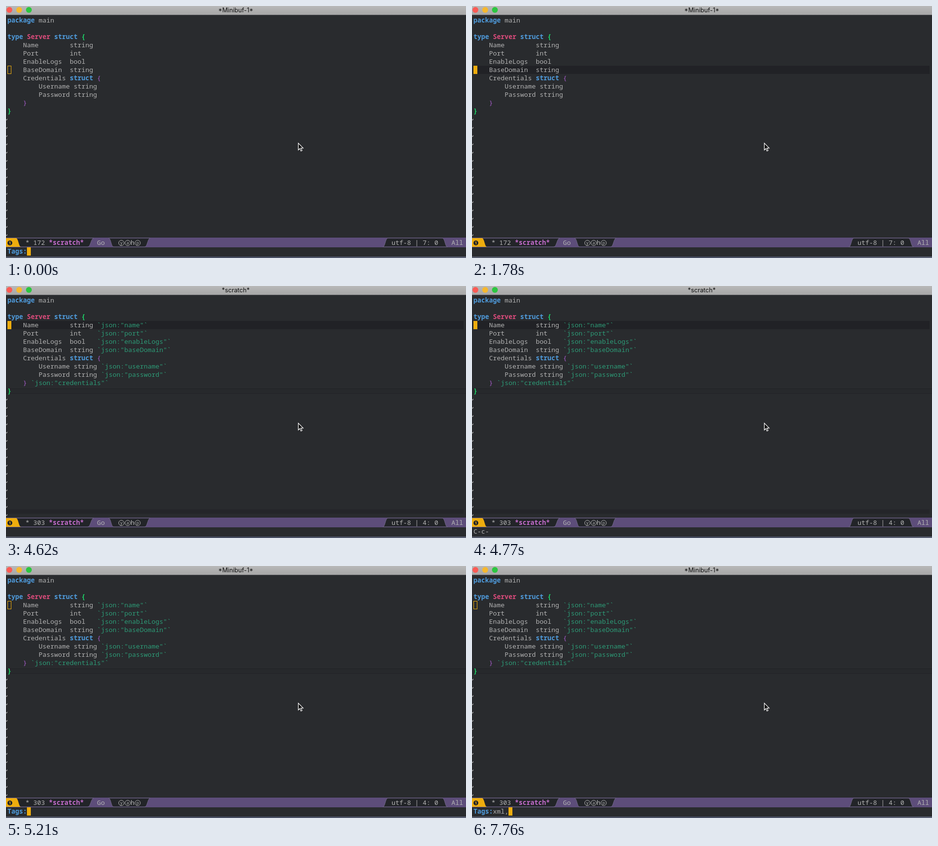
An HTML page with a canvas for the animation above (8 s loop, 945 by 519 pixels).

```html
<!DOCTYPE html>
<html lang="en">
<head>
<meta charset="utf-8">
<title>Editor session</title>
<style>
  html, body { margin: 0; width: 100%; height: 100%; overflow: hidden; background: #292b2e; }
  canvas { display: block; }
</style>
</head>
<body>
<canvas id="stage" width="945" height="519"></canvas>
<script>
const ctx = document.getElementById('stage').getContext('2d');
const W = 945, H = 519, LOOP = 8000;
const COL = 8, ROW = 17, LEFT = 3, TOP = 21, MINI_TOP = 497;
const MONO = '13.333px "Noto Sans Mono", "DejaVu Sans Mono", monospace';

const C = {
  bg: '#292b2e', dark: '#222428', line: '#212226', text: '#b2b2b2', blue: '#4f9bdc',
  rose: '#dc4c7c', green: '#1ed468', violet: '#a45bc8', pink: '#c36ccb',
  teal: '#2d9a76', amber: '#eead0e', purple: '#5d4d7a', seam: '#6f6784'
};

const BASE = { title: '*Minibuf-1*', tags: false, focus: false, line: 7, mini: [] };
const prompt = typed => ({ mini: [['Tags:', C.blue, 'bold'], [typed, C.text]], caret: 5 + typed.length });

// Each step overrides the state left by the one before it.
const STEPS = [
  [0, prompt('')],
  [1050, prompt('j')],
  [1190, prompt('jso')],
  [1340, prompt('json')],
  [1780, { focus: true, mini: [], caret: null }],
  [1930, { title: '*scratch*', tags: true, line: 4, plainBrace: true, mini: [['Applied go-tag', C.text]] }],
  [2080, { plainBrace: false }],
  [4620, { mini: [] }],
  [4770, { mini: [['C-c-', C.text]] }],
  [5070, { help: true, mini: [['C-c-  ', C.text], ['[C-h paging/help]', C.teal]] }],
  [5210, { title: '*Minibuf-1*', focus: false, help: false, ...prompt('') }],
  [6560, prompt('x')],
  [6710, prompt('xm')],
  [7310, prompt('xml')],
  [7760, prompt('xml,')]
];

const FIELDS = [
  [4, 4, 'Name', 16, 'string', 23, 'name'],
  [5, 4, 'Port', 16, 'int', 23, 'port'],
  [6, 4, 'EnableLogs', 16, 'bool', 23, 'enableLogs'],
  [7, 4, 'BaseDomain', 16, 'string', 23, 'baseDomain'],
  [9, 8, 'Username', 17, 'string', 24, 'username'],
  [10, 8, 'Password', 17, 'string', 24, 'password'],
  [11, 4, '', 4, '', 6, 'credentials']
];

// Column of the arrow, then key and command for each row.
const HELP = [
  [2, [['@', '+prefix'], ['a', 'org-agenda'], ['c', 'org-capture']]],
  [18, [['l', 'org-store-link'], ['p', '+projectile-command-map'], ['T', 'go-tag-remove']]],
  [48, [['t', 'go-tag-add'], ['C-a', 'go-import-add'], ['C-d', 'godef-describe']]],
  [69, [['C-f', '+go-goto-map'], ['C-j', 'godef-jump'], ['C-t', 'gomodifytags']]],
  [90, [['C-w', '+prefix'], ['left', 'winner-undo'], ['right', 'winner-redo']]]
];

const rowTop = row => TOP + (row - 1) * ROW;
const colX = col => LEFT + col * COL;

function rect(x, y, w, h, color) {
  ctx.fillStyle = color;
  ctx.fillRect(x, y, w, h);
}

function write(str, x, baseline, color = C.text, weight = 'normal') {
  ctx.font = `${weight} ${MONO}`;
  ctx.fillStyle = color;
  ctx.fillText(str, x, baseline);
}

const cell = (str, col, top, color, weight) => write(str, colX(col), top + 13, color, weight);
const code = (str, col, row, color, weight) => cell(str, col, rowTop(row), color, weight);

function disc(x, y, r, color) {
  ctx.fillStyle = color;
  ctx.beginPath();
  ctx.arc(x, y, r, 0, 7);
  ctx.fill();
}

function centered(str, x, y, font, color) {
  ctx.textAlign = 'center';
  ctx.font = font;
  ctx.fillStyle = color;
  ctx.fillText(str, x, y);
  ctx.textAlign = 'left';
}

function titleBar(title) {
  const shade = ctx.createLinearGradient(0, 0, 0, 18);
  shade.addColorStop(0, '#b8b8b8');
  shade.addColorStop(1, '#a7a7a7');
  rect(0, 0, W, 18, shade);
  rect(0, 18, W, 1, '#55565a');
  ['#fb5b55', '#f6b82e', '#2bc640'].forEach((color, i) => disc(7 + i * 20, 8, 6, color));
  centered(title, 472, 13, '12.7px Inter, Roboto, sans-serif', '#111');
}

function buffer(s) {
  if (s.focus) rect(LEFT, rowTop(s.line), 937, ROW, C.line);
  if (s.tags) {
    rect(0, 211, W, 11, '#27292c');
    rect(0, 211, W, 1, '#212226');
    rect(0, 221, W, 1, '#212226');
    if (s.focus && !s.help) rect(0, 460, 940, 9, '#242529');
  }
  code('package', 0, 1, C.blue, 'bold');
  code('main', 8, 1);
  code('type', 0, 3, C.blue, 'bold');
  code('Server', 5, 3, C.rose, 'bold');
  code('struct', 12, 3, C.blue, 'bold');
  code('{', 19, 3, C.green, 'bold');
  code('Credentials', 4, 8);
  code('struct', 16, 8, C.blue, 'bold');
  code('{', 23, 8, C.violet);
  code('}', 4, 11, C.violet);
  code('}', 0, 12, s.plainBrace ? C.text : C.green, s.plainBrace ? 'normal' : 'bold');
  for (const [row, col, name, typeCol, type, tagCol, tag] of FIELDS) {
    code(name, col, row);
    code(type, typeCol, row);
    if (s.tags) code('`json:"' + tag + '"`', tagCol, row, C.teal);
  }
  const y = rowTop(s.line);
  if (s.focus) {
    rect(LEFT, y, COL, ROW, C.amber);
  } else {
    ctx.strokeStyle = C.amber;
    ctx.lineWidth = 1;
    ctx.strokeRect(LEFT + .5, y + .5, COL - 1, ROW - 1);
  }
  ctx.strokeStyle = '#c8c8c8';
  ctx.lineWidth = 1.2;
  for (let row = 13; row <= (s.help ? 24 : 27); row++) {
    const mid = rowTop(row) + 8;
    ctx.beginPath();
    ctx.moveTo(0, mid + 2);
    ctx.quadraticCurveTo(2, mid + 2, 2.5, mid - .5);
    ctx.stroke();
  }
}

// A band whose sides swing in an S from the top x to the bottom x.
function band(y, l0, l1, r0, r1, color, edge) {
  const bottom = y + 18, mid = y + 9;
  const left = () => ctx.bezierCurveTo((l0 + l1) / 2, bottom, (l0 + l1) / 2, mid - 7, l0, y);
  ctx.beginPath();
  ctx.moveTo(l0, y);
  ctx.lineTo(r0, y);
  ctx.bezierCurveTo((r0 + r1) / 2, mid - 7, (r0 + r1) / 2, bottom, r1, bottom);
  ctx.lineTo(l1, bottom);
  left();
  ctx.fillStyle = color;
  ctx.fill();
  if (edge) {
    ctx.strokeStyle = C.seam;
    ctx.lineWidth = 1;
    ctx.stroke();
  }
}

function ring(letter, x, y) {
  ctx.strokeStyle = C.text;
  ctx.lineWidth = 1;
  ctx.beginPath();
  ctx.arc(x, y, 5.5, 0, 7);
  ctx.stroke();
  centered(letter, x, y + 2.5, '9px "Noto Sans", sans-serif', C.text);
}

function modeLine(s) {
  const top = s.help ? 426 : 477, y = top + 1, base = top + 15, mid = top + 11;
  rect(0, top, W, 20, C.purple);
  band(y, 0, 0, 180, 168, C.dark, true);
  band(y, 211, 221, 296, 285, C.dark, true);
  band(y, 784, 774, 897, 907, C.dark, true);
  band(y, -2, -2, 21, 31, C.amber);
  disc(8, mid, 5, C.dark);
  centered('1', 8, mid + 3, 'bold 8px "Noto Sans", sans-serif', C.amber);
  write(s.tags ? '* 303' : '* 172', 40, base);
  write('*scratch*', 88, base, C.pink, 'bold');
  write('Go', 187, base);
  ring('y', 237, mid);
  ring('a', 250, mid);
  write('h', 256, base);
  ring('p', 270.5, mid);
  write(`utf-8 | ${s.line}: 0`, 792, base);
  write('All', 915, base);
}

function helpPanel() {
  for (const [col, entries] of HELP) {
    entries.forEach(([key, command], i) => {
      const top = 446 + i * ROW;
      cell(key, col - 1 - key.length, top, C.pink, 'bold');
      cell('→', col, top, C.teal);
      cell(command, col + 2, top, command[0] === '+' ? C.blue : C.text);
    });
  }
}

function miniBuffer(s) {
  let col = 0;
  for (const [str, color, weight] of s.mini) {
    cell(str, col, MINI_TOP, color, weight);
    col += str.length;
  }
  if (s.caret) rect(colX(s.caret), MINI_TOP, COL, ROW, C.amber);
  const desk = ctx.createLinearGradient(0, 0, W, 0);
  desk.addColorStop(0, '#565b6b');
  desk.addColorStop(.5, '#454c60');
  desk.addColorStop(1, '#5b6174');
  rect(0, 516, W, 3, desk);
}

function pointer() {
  const path = new Path2D('M600.5 282.5v14l3.2-3 2.2 5.2 2.3-1-2.2-5h4.5z');
  ctx.fillStyle = '#111';
  ctx.fill(path);
  ctx.strokeStyle = '#fff';
  ctx.lineWidth = 1.2;
  ctx.stroke(path);
}

function stateAt(time) {
  return Object.assign({}, BASE, ...STEPS.filter(([at]) => at <= time).map(([, change]) => change));
}

function draw(time) {
  const s = stateAt(time);
  rect(0, 0, W, H, C.bg);
  titleBar(s.title);
  buffer(s);
  modeLine(s);
  if (s.help) helpPanel();
  miniBuffer(s);
  pointer();
}

const start = performance.now();
function tick() {
  draw((performance.now() - start) % LOOP);
  requestAnimationFrame(tick);
}
tick();
</script>
</body>
</html>
```
